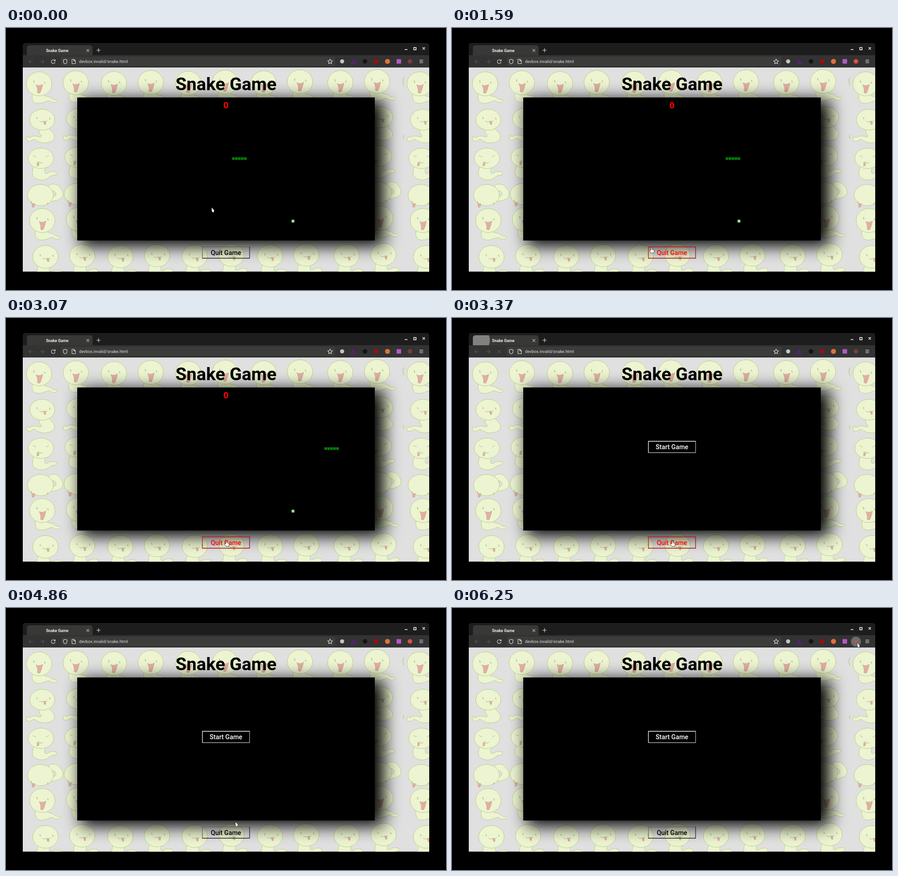
These frames come from a looping animation (970x577 px, 6.3 s). An HTML page:

```html
<!DOCTYPE html>
<html lang="en">
<head>
<meta charset="utf-8">
<title>Snake Game</title>
<style>
html, body { margin: 0; width: 100%; height: 100%; overflow: hidden; background: #000; }
svg { display: block; font-family: Roboto, "Noto Sans", sans-serif; }
text { text-anchor: middle; }
.line { fill: none; stroke: #e4e4e4; stroke-width: 1.1; }
.bold { stroke: #fff; stroke-width: 1.5; }
.dim { opacity: .2; }
.skin { fill: #ecf4d2; stroke: #b7d07c; stroke-width: 1; }
.eye { fill: none; stroke: #a6c064; stroke-width: 1.5; stroke-linecap: round; }
.thin { stroke-width: 1; }
.pink { fill: #e2aea4; stroke: #c6a57a; stroke-width: .7; }
.button { --lit: #666; --shade: #222; color: #000; font-size: 14.2px; font-weight: 500; }
.button text { fill: currentColor; }
.button path { fill: none; stroke: var(--lit); stroke-width: 1.3; }
.button path + path { stroke: var(--shade); }
.button.hot { --lit: #c81010; --shade: #a80808; color: #f00; }
.button.white { --lit: #fff; --shade: #b0b0b0; color: #fff; }
</style>
</head>
<body>
<svg width="970" height="577" viewBox="0 0 970 577">
  <defs>
    <clipPath id="page"><rect x="37" y="87" width="896" height="449.500"/></clipPath>
    <clipPath id="tabClip"><path d="M46 60V44q0-6 6-6H185q6 0 6 6V60z"/></clipPath>
    <g id="smile">
      <path class="eye" d="M-12-5l1 3M16-4l1 3"/>
      <path class="eye thin" d="M-6 3q5 4 9 0q4 4 8-1"/>
      <path class="pink" d="M3 4l4-1l1 6q-2 4-4 0z"/>
    </g>
    <path id="curlRight" class="skin" d="M-14 16C-20 28-22 40-10 45C2 51 14 46 20 40Q26 36 33 37Q36 33 33 30Q22 27 14 33C8 36 5 28 13 16z"/>
    <!-- laughing -->
    <g id="laugh">
      <path class="skin" d="M-14 20C-18 32-14 42-4 43C8 44 16 37 22 37Q28 42 36 41Q42 38 38 35Q30 36 25 30C17 25 10 31 10 20z"/>
      <ellipse class="skin" rx="28" ry="26.5"/>
      <path class="eye" d="M-12-7l1 4M12-4l1 3"/>
      <path class="pink" d="M-7 2Q0 6 8 1Q6 12 2 20Q-1 22-4 19Q-2 12-7 2z"/>
    </g>
    <!-- tongue out, tail left -->
    <g id="tease">
      <path class="skin" d="M14 16C16 26 28 28 27 38C26 48 14 51 2 51C-10 50-14 43-20 43Q-26 49-33 47Q-37 40-33 36Q-31 41-27 39C-20 34-12 36-6 38Q2 38-6 30L-9 16z"/>
      <ellipse class="skin" rx="27.5" ry="23"/>
      <use href="#smile"/>
    </g>
    <!-- cross -->
    <g id="cross">
      <use href="#curlRight"/>
      <ellipse class="skin" rx="28" ry="22.5"/>
      <path class="eye thin" d="M-17-6l6 3M12-3l5-3M-9 10q4-5 7 0q4 2 6-1"/>
      <path class="pink" d="M-8 10l4 0l-1 6l-4 1z"/>
    </g>
    <!-- lying down -->
    <g id="flop">
      <path class="skin" d="M20-13C10-26 38-28 42-17Q50-10 50-2Q50 11 24 14L23 4Q36 4 34-5Q30-12 20-9z"/>
      <ellipse class="skin" rx="28.5" ry="23.5"/>
      <path class="eye" d="M-20 14v3M16 17v3"/>
      <path class="pink" d="M-19 18l7 1l-2 7l-4 1z"/>
    </g>
    <!-- tongue out, tail right -->
    <g id="grin">
      <use href="#curlRight"/>
      <ellipse class="skin" rx="28" ry="25"/>
      <use href="#smile"/>
    </g>
  </defs>

  <!-- window frame -->
  <path fill="#1d1d1d" d="M37 87V39q0-6 6-6H927q6 0 6 6V87z"/>
  <rect x="37" y="60" width="896" height="27" fill="#333"/>
  <rect x="121" y="63.500" width="605" height="20" rx="3" fill="#3c3c3b"/>
  <g clip-path="url(#tabClip)">
    <rect x="46" y="38" width="145" height="22" fill="#383836"/>
    <circle id="burst" cx="57" cy="49" fill="#fff"/>
  </g>
  <text x="113" y="52.500" font-size="8.8" font-weight="700" fill="#eee">Snake Game</text>
  <text x="161" y="77" font-size="9.25" fill="#ddd" style="text-anchor:start">devbox.invalid/snake.html</text>
  <path class="line" opacity=".7" d="M177.500 46.500l6 6m0-6l-6 6"/>
  <path class="line" d="M199.500 49h9M204 44.500v9"/>
  <path class="line bold" d="M879 47.500h6M899 43h5v5h-5zM918.500 42.500l5 5m0-5l-5 5"/>
  <path class="line dim" d="M59.500 74h-9m4-4l-4 4l4 4M75 74h9m-4-4l4 4l-4 4"/>
  <path id="reload" class="line" d="M107.500 71.500a4.200 4.200 0 1 0 .7 3.500M108.500 69v3.500h-3.500"/>
  <path id="stop" class="line dim" d="M100.500 70.500l7 7m0-7l-7 7"/>
  <path class="line" d="M130.500 69l4 1.500v3q0 4-4 5.500q-4-1.500-4-5.500v-3zM145.500 69h4.500l3 3v6.500h-7.500zM149.500 69v3.500h3.500"/>
  <path class="line" d="M714.500 68.500l1.600 3.300l3.600.5l-2.600 2.500l.6 3.600l-3.200-1.700l-3.200 1.700l.6-3.600l-2.600-2.500l3.600-.5z"/>
  <circle cx="741" cy="73.500" r="4.500" fill="#c4c4c4"/>
  <path class="line" style="stroke:#7414a8;stroke-width:1.4" d="M766 68.500v7m-3-3l3 3l3-3M761.500 75.500v3h9v-3"/>
  <circle cx="791.500" cy="73.500" r="5" fill="#151515"/>
  <circle cx="816" cy="73.500" r="5" fill="#a00d0d"/>
  <circle cx="841" cy="73.500" r="5.500" fill="#e2703a"/>
  <rect x="861" y="68.500" width="10" height="10" rx="1" fill="#b558c8"/>
  <circle id="halo" cx="890.500" cy="74" r="11" fill="#6b6b6b"/>
  <circle id="record" cx="890.500" cy="73.500" r="5" fill="#e2503f"/>
  <path class="line" d="M911.500 70.500h8m-8 3h8m-8 3h8"/>

  <!-- page -->
  <g clip-path="url(#page)">
    <rect x="37" y="87" width="896" height="450" fill="#e0e0e0"/>
    <g id="wallpaper">
      <path class="eye thin" d="M877 109q-4 8 0 17M877 236q-2 4 0 8"/>
    </g>
    <rect x="165" y="158" width="668" height="322" style="filter:blur(18px)"/>
    <rect x="157" y="153" width="656" height="315"/>
    <text x="485" y="137" font-size="39.400" font-weight="700">Snake Game</text>
    <g id="quit" class="button">
      <path d="M433 507.500V482H537.500"/><path d="M432.400 507H537V481.500"/>
      <text x="485" y="499.700">Quit Game</text>
    </g>
    <g id="menu" class="button white">
      <path d="M433 297V271.500H537.500"/><path d="M432.400 296.500H537V271"/>
      <text x="485" y="289.200">Start Game</text>
    </g>
    <g id="game">
      <text x="485" y="176.800" font-size="19.700" font-weight="700" font-family="'Noto Sans', sans-serif" fill="#f00">0</text>
      <rect x="629.600" y="422.300" width="6" height="6" fill="#90ee90"/>
      <g id="snake" fill="#067d06"></g>
    </g>
  </g>

  <path id="arrow" d="M0 0L6.200 6.500L4.600 12L.4 8.800z" fill="#fff" stroke="#222" stroke-width=".8"/>
  <path id="hand" d="M-1.200 6V.5q1.200-1.400 2.400 0V4l4 1.200q1 .6.700 2.300l-1 4.500H-1L-4.300 7.500q0-1.800 1.500-1.300z" fill="#fff" stroke="#222" stroke-width=".8"/>
</svg>
<script>
const LOOP = 6300, CELL = 6.56, QUIT_AT = 3270, LOAD_AT = 3320;
const $ = id => document.getElementById(id);

function add(parent, tag, attrs) {
  const el = document.createElementNS("http://www.w3.org/2000/svg", tag);
  for (const key in attrs) el.setAttribute(key, attrs[key]);
  parent.append(el);
}

// Ten uneven columns per wallpaper tile, then the next tile begins.
const columns = [0, 81, 165, 246, 329, 410, 495, 575, 664, 745, 839];
const rows = [
  [73, 123, "laugh"], [80, 202, "tease"], [77, 287, "cross"],
  [76, 368, "flop"], [80, 424, "laugh"], [87, 504, "grin"]
];
for (const [x, y, pose] of rows)
  columns.forEach((dx, i) => {
    const n = i % 10;
    add($("wallpaper"), "use", { href: "#" + pose, x: x + dx, y: y - n * .35 - n % 2 * 2 });
  });

for (let i = 0; i < 5; i++)
  add($("snake"), "rect", { x: 157.3 + (52 + i) * CELL, y: 284.7, width: 5.8, height: 5.8 });

// Pointer path: time, x, y
const path = [
  [0, 453, 395], [100, 453, 395], [740, 248, 451], [800, 246, 453],
  [1900, 486, 491], [4750, 486, 491], [5550, 855, 98], [6100, 893, 76], [LOOP, 893, 76]
];
function pointer(t) {
  const i = path.findIndex(p => p[0] > t);
  const [t0, x0, y0] = path[i - 1], [t1, x1, y1] = path[i];
  const p = (t - t0) / (t1 - t0), e = p * p * (3 - 2 * p);
  return [x0 + (x1 - x0) * e, y0 + (y1 - y0) * e];
}

const show = (id, on) => $(id).style.display = on ? "" : "none";
const place = (id, x, y) => $(id).setAttribute("transform", `translate(${x} ${y})`);

function draw(t) {
  const playing = t < QUIT_AT;
  show("game", playing);
  show("menu", !playing);
  place("snake", (t < 100 ? 0 : Math.floor((t + 70) / 100)) * CELL, 0);

  const [x, y] = pointer(t);
  const overQuit = x > 432 && x < 538 && y > 481 && y < 508;
  $("quit").classList.toggle("hot", overQuit);
  show("hand", overQuit);
  show("arrow", !overQuit);
  place("hand", x, y);
  place("arrow", x, y);
  show("halo", Math.hypot(x - 890.5, y - 74) < 11);

  const loading = t >= LOAD_AT && t < 3970;
  show("stop", loading);
  show("reload", !loading);
  const p = Math.min(1, Math.max(0, (t - LOAD_AT) / 375));
  $("burst").setAttribute("r", p * 195);
  $("burst").setAttribute("opacity", .42 * (1 - p));

  // The recording light pulses once a second.
  $("record").setAttribute("opacity", t % 1000 >= 500 ? 1 : .4);
}

function tick() {
  draw(performance.now() % LOOP);
  requestAnimationFrame(tick);
}
tick();
</script>
</body>
</html>
```
